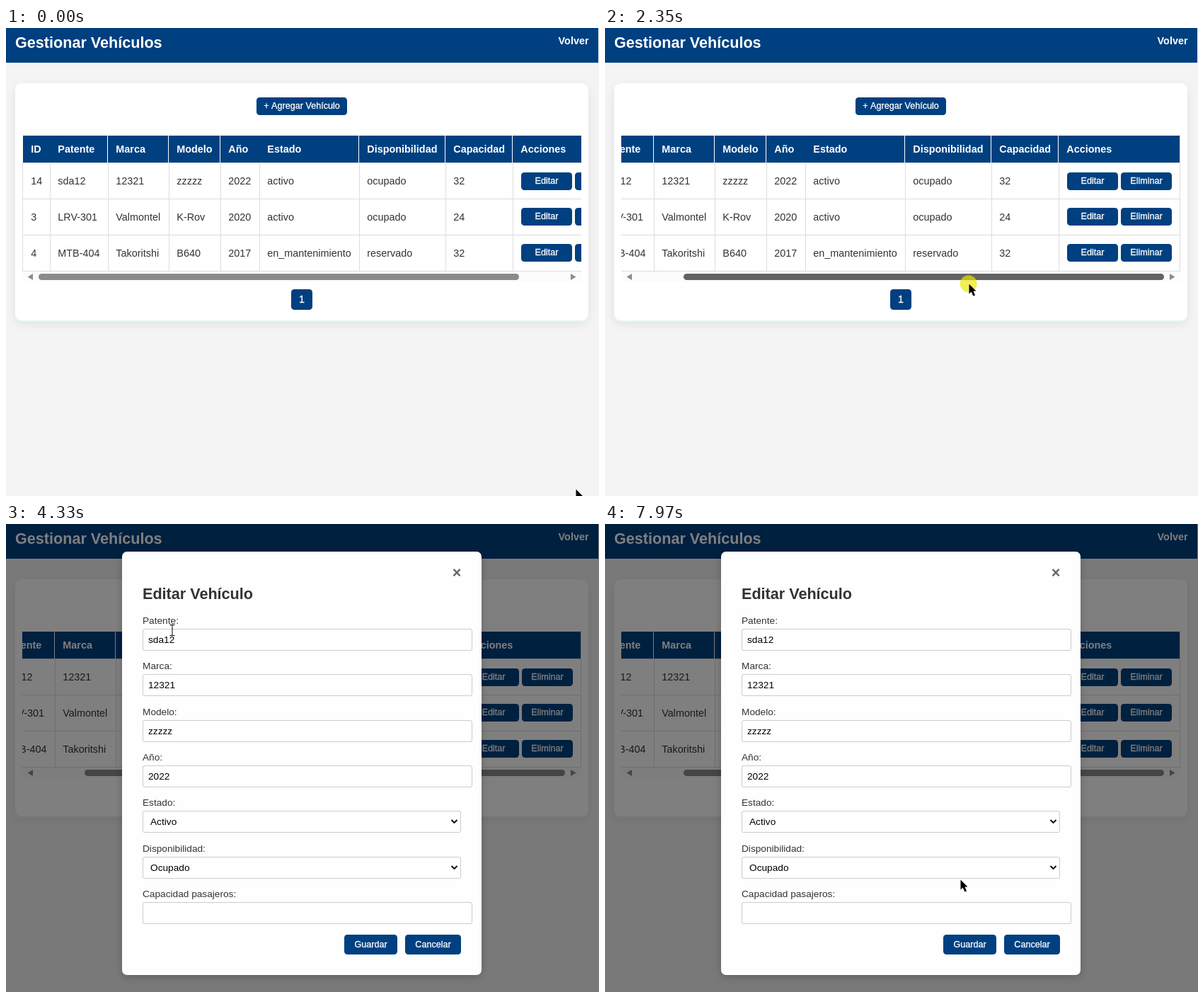
Recreate the animation shown at these times as an HTML page with a canvas. Size 838 by 661 pixels, loop 8 s.

```html
<!DOCTYPE html>
<html lang="es">
<head>
<meta charset="utf-8">
<title>Gestionar Vehículos</title>
<style>
html, body { margin: 0; width: 100%; height: 100%; overflow: hidden; background: #f4f4f4; }
canvas { display: block; }
</style>
</head>
<body>
<canvas id="stage" width="838" height="661"></canvas>
<script>
const g = document.getElementById('stage').getContext('2d');
const LOOP = 8000, NAVY = '#004080', GREY = '#8b8b8b';
const PRESS = 1670, DRAG = 2110, RELEASE = 2400, MODAL = 3290;

// Pointer stops: time, x, y
const stops = [
  [30, 805, 651], [810, 375, 150], [1300, 482, 270], [PRESS, 437, 351],
  [DRAG, 437, 351], [RELEASE, 520, 362], [2700, 703, 226], [3540, 704, 227],
  [4330, 235, 150], [4700, 637, 415], [5130, 203, 478], [6010, 637, 411],
  [6360, 245, 253], [7040, 653, 47], [7450, 653, 47], [7970, 502, 502]
];

// Table columns: width, heading, cells
const columns = [
  [38, 'ID', '14', '3', '4'],
  [82, 'Patente', 'sda12', 'LRV-301', 'MTB-404'],
  [86, 'Marca', '12321', 'Valmontel', 'Takoritshi'],
  [73, 'Modelo', 'zzzzz', 'K-Rov', 'B640'],
  [55, 'Año', '2022', '2020', '2017'],
  [141, 'Estado', 'activo', 'activo', 'en_mantenimiento'],
  [122, 'Disponibilidad', 'ocupado', 'ocupado', 'reservado'],
  [95, 'Capacidad', '32', '24', '32'],
  [171, 'Acciones']
];

const fields = [
  ['Patente', 'sda12'], ['Marca', '12321'], ['Modelo', 'zzzzz'], ['Año', '2022'],
  ['Estado', 'Activo', true], ['Disponibilidad', 'Ocupado', true], ['Capacidad pasajeros', '']
].map(([label, value, select], i) =>
  ({ label, value, select, y: Math.round(148 + 64.35 * i), w: select ? 450 : 466 }));

const arrowShape = new Path2D('M0 0v14l3-3 3 6 2.5-1-2.5-6h4z');
const handShape = new Path2D('M-2 1q2-2 4 0v6l6 1.5 2 2v4l-2 6h-8l-6-9 1-1.5 3 2z');

const clamp = (v, max = 1) => Math.max(0, Math.min(max, v));
const ramp = (t, a, b) => clamp((t - a) / (b - a));
const inside = (p, x, y, w, h) => p.x >= x && p.x < x + w && p.y >= y && p.y < y + h;
const buttonY = row => Math.floor(204 + 50.5 * row);

function pointer(t) {
  const i = clamp(stops.findIndex(s => s[0] > t) - 1, stops.length - 2);
  const last = t >= stops[stops.length - 1][0];
  const [ta, xa, ya] = stops[last ? stops.length - 2 : i];
  const [tb, xb, yb] = stops[last ? stops.length - 1 : i + 1];
  const k = ramp(t, ta, tb), e = k * k * (3 - 2 * k);
  return { x: xa + (xb - xa) * e, y: ya + (yb - ya) * e };
}

function rect(x, y, w, h, color) {
  g.fillStyle = color;
  g.fillRect(x, y, w, h);
}

function box(x, y, w, h, r, color) {
  g.beginPath();
  g.roundRect(x, y, w, h, r);
  g.fillStyle = color;
  g.fill();
}

function shadowBox(x, y, w, h, r, color, blur, alpha) {
  g.save();
  g.shadowColor = `rgba(0,0,0,${alpha})`;
  g.shadowBlur = blur;
  g.shadowOffsetY = 3;
  box(x, y, w, h, r, color);
  g.restore();
}

function text(s, x, y, size, color, weight = 'normal', align = 'left') {
  g.font = `${weight} ${size}px "Liberation Sans", Arial, sans-serif`;
  g.textAlign = align;
  g.fillStyle = color;
  g.fillText(s, x, y);
}

function button(label, x, y, w, h, color = NAVY, size = 12.6) {
  const cx = x + w / 2, baseline = Math.floor(y + h / 2 + size / 3);
  box(x, y, w, h, 4.5, color);
  text(label, cx, baseline, size, '#fff', 'normal', 'center');
  g.lineWidth = 0.3;
  g.strokeStyle = '#fff';
  g.strokeText(label, cx, baseline);
}

function polyline(...points) {
  g.beginPath();
  points.forEach(([x, y]) => g.lineTo(x, y));
}

function table(scroll, p, open) {
  g.save();
  g.beginPath();
  g.rect(23, 151, 790, 193);
  g.clip();
  g.translate(-scroll, 0);
  rect(23, 151, 865, 193, '#fff');
  rect(24, 152, 863, 38, NAVY);
  for (let y = 190; y < 344; y += 51) rect(23, y, 865, 1, '#ddd');

  let x = 24;
  columns.forEach(([width, heading, ...cells], i) => {
    rect(i ? x : 23, 190, 1, 154, '#ddd');
    if (i && i % 4 !== 1) rect(x - 1, 152, 1, 38, '#fff');
    text(heading, x + 11.3, 176, 14.4, '#fff', 'bold');
    cells.forEach((s, row) => text(s, x + 11.3, 221 + 51 * row, 14.4, '#333'));
    x += width;
  });
  rect(x, 151, 1, 193, '#ddd');

  const local = { x: p.x + scroll, y: p.y };
  for (let row = 0; row < 3; row++) {
    ['Editar', 'Eliminar'].forEach((label, i) => {
      const area = [728 + 76 * i, buttonY(row), 72, 25];
      const hot = !open && p.x < 813 && inside(local, ...area);
      button(label, ...area, hot ? '#002b59' : NAVY);
    });
  }
  g.restore();
}

function scrollbar(shift, dark) {
  rect(23, 344, 790, 15, '#fcfcfc');
  g.fillStyle = GREY;
  for (const side of [-1, 1]) {
    const x = 418 + 380 * side;
    polyline([x + 7.5 * side, 351.5], [x, 347], [x, 356]);
    g.fill();
  }
  box(46 + shift, 347, 679, 9, 4.5, dark ? '#636363' : GREY);
}

function page(t, p, open) {
  rect(0, 0, 838, 661, '#f4f4f4');
  rect(0, 0, 837, 49, NAVY);
  text('Gestionar Vehículos', 13, 28, 21.6, '#fff', 'bold');
  text('Volver', 823.5, 23, 14.4, '#fff', 'bold', 'right');
  shadowBox(13, 80, 810, 335, 9, '#e2f6fa', 14, 0.08);
  box(13, 78, 810, 335, 9, '#fff');
  button('+ Agregar Vehículo', 354, 98, 128, 25);

  const dragging = t >= PRESS && t < RELEASE;
  const shift = t < DRAG ? 0 : t < RELEASE ? clamp(p.x - 437, 65) : 65;
  table(shift * 75 / 65, p, open);
  scrollbar(shift, dragging || !open && inside(p, 46 + shift, 345, 679, 13));
  button('1', 403, 369, 30, 29, NAVY, 14.4);
}

function modal() {
  rect(0, 0, 838, 661, 'rgba(0,0,0,.5)');
  shadowBox(164, 39, 508, 598, 7, '#fefefe', 12, 0.2);
  text('×', 637, 76, 21.6, '#666', 'bold', 'center');
  text('Editar Vehículo', 193, 106, 21.6, '#333', 'bold');
  for (const { label, value, select, y, w } of fields) {
    text(label + ':', 193, y - 7, 13.68, '#333');
    box(193, y, w, 31, 3.6, '#ccc');
    box(194, y + 1, w - 2, 29, 2.6, '#fff');
    text(value, select ? 204 : 201, y + 20, 13.68, '#000');
    if (select) {
      polyline([629.5, y + 13], [633.5, y + 17], [637.5, y + 13]);
      g.strokeStyle = '#000';
      g.lineWidth = 1.9;
      g.stroke();
    }
  }
  button('Guardar', 478, 580, 75, 28);
  button('Cancelar', 564, 580, 79, 28);
}

function icon(shape, fill, edge, width) {
  g.strokeStyle = edge;
  g.lineWidth = width;
  g.stroke(shape);
  g.fillStyle = fill;
  g.fill(shape);
}

function arrow() {
  g.translate(0.5, 0.5);
  icon(arrowShape, '#000', '#fff', 1);
}

function hand() {
  icon(handShape, '#fff', '#000', 2);
  for (const x of [2, 5, 8]) rect(x, 7.5, 1, 4, '#000');
}

function beam() {
  rect(-0.5, -8, 1, 16, '#000');
  for (const y of [-8, 7]) rect(-3.5, y, 7, 1, '#000');
}

function cursor(t, p, open) {
  const glow = ramp(t, PRESS, 1830) * (1 - ramp(t, RELEASE, 2500))
    + ramp(t, 3080, 3130) * (1 - ramp(t, 3240, 3340));
  g.beginPath();
  g.arc(p.x, p.y, 12, 0, 2 * Math.PI);
  g.fillStyle = `rgba(235,232,0,${0.68 * glow})`;
  g.fill();

  const overButton = !open && t > RELEASE && [0, 1, 2].some(row => inside(p, 653, buttonY(row), 72, 25));
  const overInput = open && fields.some(f => !f.select && inside(p, 193, f.y, f.w, 31));
  g.save();
  g.translate(Math.round(p.x), Math.round(p.y));
  (overButton ? hand : overInput ? beam : arrow)();
  g.restore();
}

function draw(now) {
  const t = now % LOOP, p = pointer(t), open = t >= MODAL;
  page(t, p, open);
  if (open) modal();
  cursor(t, p, open);
  requestAnimationFrame(draw);
}
requestAnimationFrame(draw);
</script>
</body>
</html>
```
